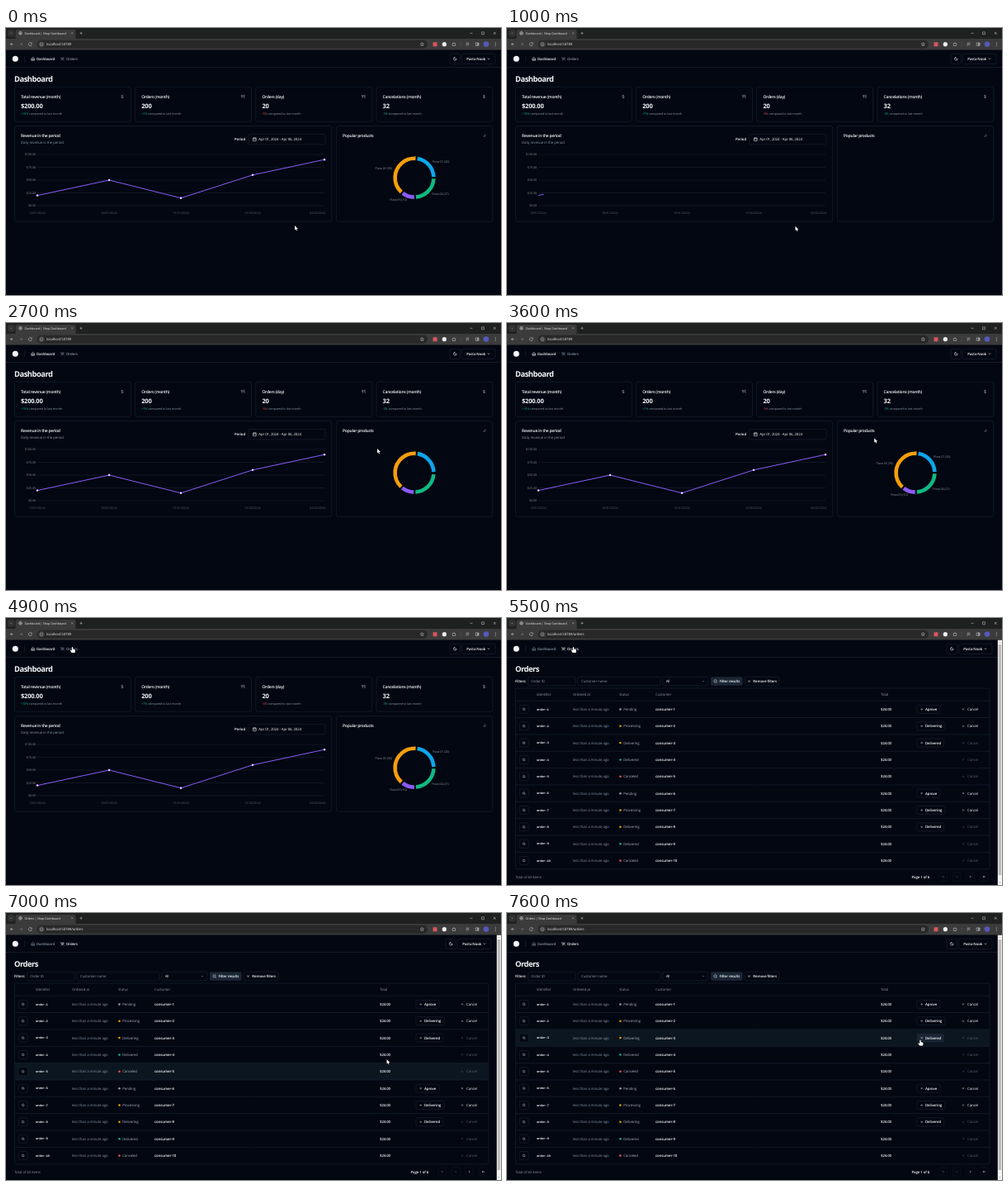
These frames come from a looping animation (600 px wide and 323 px high, 8000 ms). An HTML page with a canvas:

```html
<!DOCTYPE html>
<html lang="en">
<head>
<meta charset="utf-8">
<title>Shop dashboard</title>
<style>
html, body { margin: 0; width: 100%; height: 100%; overflow: hidden; background: #020711; }
canvas { display: block; width: 600px; height: 323px; }
</style>
</head>
<body>
<canvas id="stage"></canvas>
<script>
const LOOP = 8000, STEP = 100;
const canvas = document.getElementById('stage');
const ctx = canvas.getContext('2d');
const ratio = window.devicePixelRatio || 1;
canvas.width = 600 * ratio;
canvas.height = 323 * ratio;

const BG = '#020711', WHITE = '#f5f7fa', MUTED = '#8793a6', DIM = '#566174', BORDER = '#182031';
const SKY = '#0ea5e9', AMBER = '#f59e0b', VIOLET = '#8b5cf6', GREEN = '#10b981', ROSE = '#f4515e';
const SHOP = 'Pasta Nook';

const ICONS = {
  home: 'M3 10l9-7 9 7v11H3zM9 21v-9h6v9',
  utensils: 'M3 2v7c0 1 1 2 2 2h4a2 2 0 0 0 2-2V2M7 2v20M21 15V2a5 5 0 0 0-5 5v6c0 1 1 2 2 2h3zm0 0v7',
  crossed: 'M16 2l-2.3 2.3a3 3 0 0 0 0 4.2l1.8 1.8a3 3 0 0 0 4.2 0L22 8M15 15L3.3 3.3a4.2 4.2 0 0 0 0 6l7.3 7.3c.7.7 2 .7 2.8 0zl7 7M2 22l6.5-6.5M19 5l-7 7',
  dollar: 'M12 2v20M17 5H9.5a3.5 3.5 0 0 0 0 7h5a3.5 3.5 0 0 1 0 7H6',
  calendar: 'M3 4h18v18H3zM3 10h18M8 2v4M16 2v4',
  bars: 'M12 20V10M18 20V4M6 20v-4',
  moon: 'M12 3a6 6 0 0 0 9 9 9 9 0 1 1-9-9z',
  down: 'M6 9l6 6 6-6',
  search: 'M21 21l-4.3-4.3M19 11a8 8 0 1 1-16 0 8 8 0 0 1 16 0z',
  close: 'M18 6L6 18M6 6l12 12',
  right: 'M5 12h14M12 5l7 7-7 7',
  left: 'M19 12H5M12 19l-7-7 7-7',
  reload: 'M21 12a9 9 0 1 1-3-6.7L21 8M21 3v5h-5',
  star: 'M12 2l3 6.5 7 .8-5.2 4.8 1.4 7-6.2-3.5-6.2 3.5 1.4-7L2 9.3l7-.8z',
  plus: 'M5 12h14M12 5v14',
  minus: 'M5 12h14',
  square: 'M5 5h14v14H5z',
  panel: 'M3 4h18v16H3zM14 4v16M17 4v16M20 4v16',
  list: 'M3 5h18M3 12h11M3 19h8M18 10v9',
  puzzle: 'M4 7h5V4h5v3h5v5h2v4h-2v5H4z',
  info: 'M22 12a10 10 0 1 1-20 0 10 10 0 0 1 20 0zM12 11v6M12 7v1',
  globe: 'M22 12a10 10 0 1 1-20 0 10 10 0 0 1 20 0zM2 12h20M12 2c-5 6-5 14 0 20 5-6 5-14 0-20',
  prev: 'M15 18l-6-6 6-6',
  next: 'M9 18l6-6-6-6',
  first: 'M11 17l-5-5 5-5M18 17l-5-5 5-5',
  last: 'M6 17l5-5-5-5M13 17l5-5-5-5'
};
for (const name in ICONS) ICONS[name] = new Path2D(ICONS[name]);
const ARROW = new Path2D('M0 0V6.1L1.4 4.8 2.4 7 3.4 6.5 2.5 4.5H4.4Z');
const HAND = new Path2D('M-.7 .4Q0-.5 .7 .4V2.6L3 3.2Q3.6 3.5 3.5 4.4L3 7H-.9L-2.6 4.4Q-2.6 3.4-1.6 3.8L-.7 4.5Z');

// y is the vertical centre of the capitals
function text(str, x, y, { color = WHITE, size = 4.375, weight = 400, align = 'left', track = -0.025, font = '"Open Sans", sans-serif' } = {}) {
  ctx.font = `${weight} ${size}px ${font}`;
  ctx.letterSpacing = `${track * size}px`;
  ctx.textAlign = align;
  ctx.fillStyle = color;
  ctx.fillText(str, x, y + size * 0.35);
}

function box(x, y, w, h, { fill, stroke, r = 1.8 } = {}) {
  ctx.beginPath();
  ctx.roundRect(x, y, w, h, r);
  if (fill) { ctx.fillStyle = fill; ctx.fill(); }
  if (stroke) { ctx.strokeStyle = stroke; ctx.lineWidth = 0.7; ctx.stroke(); }
}

function icon(name, cx, cy, size = 5, color = WHITE) {
  ctx.save();
  ctx.translate(cx - size / 2, cy - size / 2);
  ctx.scale(size / 24, size / 24);
  ctx.lineWidth = 2.6;
  ctx.strokeStyle = color;
  ctx.stroke(ICONS[name]);
  ctx.restore();
}

function dot(x, y, r, color) {
  ctx.beginPath();
  ctx.arc(x, y, r, 0, 7);
  ctx.fillStyle = color;
  ctx.fill();
}

function line(points, color, width) {
  ctx.beginPath();
  points.forEach(([x, y]) => ctx.lineTo(x, y));
  ctx.strokeStyle = color;
  ctx.lineWidth = width;
  ctx.stroke();
}

const clamp = v => Math.min(1, Math.max(0, v));

// cubic-bezier(.25, .1, .25, 1)
function ease(x) {
  x = clamp(x);
  if (x === 0 || x === 1) return x;
  let lo = 0, hi = 1, u;
  for (let i = 0; i < 20; i++) {
    u = (lo + hi) / 2;
    if (0.75 * u * (1 - u) + u ** 3 < x) lo = u; else hi = u;
  }
  return 0.3 * u * (1 - u) ** 2 + 3 * u * u * (1 - u) + u ** 3;
}

const PATH = [
  [0, 350, 239], [900, 349, 239], [1500, 352, 243], [2100, 372, 250], [2300, 400, 235],
  [2700, 450, 152], [3000, 430, 133], [3500, 440, 145], [4000, 466, 116], [4400, 300, 85],
  [4900, 80.5, 35], [5700, 80.5, 35], [6200, 330, 205], [6500, 400, 221], [6900, 458, 190],
  [7000, 461.5, 177], [7100, 464, 177], [7200, 472, 200], [7400, 490, 178], [7600, 501, 153.5], [LOOP, 501, 153.5]
];
function pointer(t) {
  const i = Math.max(1, PATH.findIndex(key => key[0] >= t));
  const [t0, x0, y0] = PATH[i - 1], [t1, x1, y1] = PATH[i];
  const k = (t - t0) / (t1 - t0);
  return [x0 + (x1 - x0) * k, y0 + (y1 - y0) * k];
}

function drawBrowser(title, path) {
  const grey = '#c7c7c7';
  box(0, 0, 600, 13, { fill: '#1f2020', r: 0 });
  box(0, 13, 600, 13.5, { fill: '#3b3b3b', r: 0 });
  box(2, 2, 8.5, 8.5, { fill: '#303131', r: 2.5 });
  icon('down', 6.2, 6.3, 4, grey);
  box(11.5, 2, 73, 13, { fill: '#3b3b3b', r: 2.5 });
  icon('globe', 17.5, 6.3, 4.6, grey);
  text(title, 22.5, 6.4, { size: 3.75, color: '#e3e3e3' });
  icon('close', 80.2, 6.3, 4, grey);
  icon('plus', 91, 6.3, 5, grey);
  icon('minus', 564, 6.3, 5, grey);
  icon('square', 578, 6.3, 5, grey);
  icon('close', 592.3, 6.3, 5.5, grey);

  icon('left', 7, 19.6, 5.5, grey);
  icon('right', 18.2, 19.6, 5.5, '#777');
  icon('reload', 29.3, 19.6, 5.2, grey);
  box(37.5, 14.7, 473.5, 10, { fill: '#282828', r: 5 });
  dot(43, 19.7, 3.8, '#3b3b3b');
  icon('info', 43, 19.7, 4.4, grey);
  text('localhost:50789' + path, 49, 19.7, { color: '#e3e3e3' });
  icon('star', 504.3, 19.6, 5, grey);
  box(517.5, 17.2, 5, 5, { fill: '#d9555c', r: 0.5 });
  dot(531.3, 19.7, 2.6, '#eeeeee');
  icon('puzzle', 543, 19.6, 5, grey);
  line([[551.3, 17], [551.3, 22.4]], '#555', 0.5);
  icon('list', 559.5, 19.6, 5, grey);
  icon('panel', 571, 19.6, 5, grey);
  dot(582, 19.6, 3.3, '#5657b8');
  for (const y of [17.8, 19.6, 21.4]) dot(593.3, y, 0.5, grey);
}

function drawHeader(onOrders) {
  const shift = onOrders ? -5 : 0;
  dot(11.3, 37.3, 3.5, WHITE);
  line([[22.5, 33.5], [22.5, 41.3]], BORDER, 0.7);
  const link = (name, label, x, active) => {
    const color = active ? WHITE : MUTED;
    icon(name, x + 2.6, 37.3, 5, color);
    text(label, x + 7, 37.3, { weight: 600, color });
  };
  link('home', 'Dashboard', 30, !onOrders);
  link('crossed', 'Orders', 66, onOrders);
  box(538 + shift, 31.2, 12.5, 12.3, { stroke: BORDER });
  icon('moon', 544.3 + shift, 37.3, 5);
  box(552.5 + shift, 31.2, 40.5, 12.3, { stroke: BORDER });
  text(SHOP, 558.3 + shift, 37.3, { weight: 600 });
  icon('down', 585 + shift, 37.3, 5);
  line([[0, 47.5], [600, 47.5]], BORDER, 0.8);
}

const heading = label => text(label, 10, 61.3, { size: 9.375, weight: 700, track: -0.05 });
const cardTitle = (label, x, y) => text(label, x, y, { size: 5, weight: 600, track: -0.05 });

const CARDS = [
  ['Total revenue (month)', '$200.00', '+10%', GREEN, 'dollar'],
  ['Orders (month)', '200', '+7%', GREEN, 'utensils'],
  ['Orders (day)', '20', '-5%', ROSE, 'utensils'],
  ['Cancelations (month)', '32', '-5%', GREEN, 'dollar']
];
const REVENUE = [20, 50, 15, 60, 90].map((v, i) => [38 + i * 87, 215 - v * 0.62]);
const DAYS = ['29/01/2024', '30/01/2024', '31/01/2024', '01/02/2024', '02/02/2024'];
const SLICES = [['Pizza 01', 20, SKY], ['Pizza 03', 35, AMBER], ['Pizza 05', 10, VIOLET], ['Pizza 04', 21, GREEN]];

function drawRevenue(progress) {
  for (let i = 0; i < 5; i++) {
    const y = 215 - i * 15.5;
    line([[38, y], [386, y]], '#1d212c', 0.6);
    text(`$${i * 25}.00`, 36, y, { size: 3.75, color: '#888', align: 'right' });
    text(DAYS[i], i < 4 ? 38 + i * 87 : 377.5, 224, { size: 3.75, color: '#5b5d63', align: 'center' });
  }
  let length = 0;
  REVENUE.forEach(([x, y], i) => { if (i) length += Math.hypot(x - REVENUE[i - 1][0], y - REVENUE[i - 1][1]); });
  ctx.setLineDash([length * progress, length * 2]);
  line(REVENUE, VIOLET, 1);
  ctx.setLineDash([]);
  if (progress === 1) for (const [x, y] of REVENUE) { dot(x, y, 1.4, VIOLET); dot(x, y, 1, '#fff'); }
}

function drawDonut(progress, labelled) {
  const cx = 495, cy = 181.2, radius = 23.4, gap = 0.045;
  const total = SLICES.reduce((sum, slice) => sum + slice[1], 0);
  let from = 0;
  for (const [name, value, color] of SLICES) {
    const sweep = value / total * Math.PI * 2 * progress;
    if (sweep > gap * 2) {
      ctx.beginPath();
      ctx.arc(cx, cy, radius, -from - gap, -from - sweep + gap, true);
      ctx.strokeStyle = color;
      ctx.lineWidth = 4.6;
      ctx.stroke();
    }
    if (labelled) {
      const mid = from + sweep / 2, side = Math.cos(mid);
      text(`${name} (${value})`, cx + 29.5 * side, cy - 28.75 * Math.sin(mid) - 0.3,
        { size: 3.75, color: '#8d9096', align: side > 0 ? 'left' : 'right' });
    }
    from += sweep;
  }
}

function drawDashboard(t) {
  const settled = t < 300, loaded = settled || t >= 900;
  heading('Dashboard');
  CARDS.forEach(([title, value, change, color, glyph], i) => {
    const x = 10.4 + i * 146.2;
    box(x, 71.3, 140.9, 42, { stroke: BORDER, r: 2.5 });
    cardTitle(title, x + 7.6, 83);
    icon(glyph, x + 130.5, 83, 5, MUTED);
    if (!loaded) return;
    text(value, x + 7.6, 94.8, { size: 7.5, weight: 700 });
    text(change, x + 7.6, 103.4, { size: 3.75, color });
    text(' compared to last month', x + 7.6 + ctx.measureText(change).width, 103.4, { size: 3.75, color: MUTED });
  });

  box(10.4, 118.6, 384.4, 115.6, { stroke: BORDER, r: 2.5 });
  cardTitle('Revenue in the period', 18, 130);
  text('Daily revenue in the period', 18, 138.3, { color: MUTED });
  text('Period', 277, 134.6, { weight: 600 });
  box(293.7, 128.4, 93.3, 12.4, { stroke: BORDER });
  icon('calendar', 301.3, 134.6, 5);
  text('Apr 01, 2024 - Apr 06, 2024', 306.3, 134.6, { weight: 500 });

  box(400.4, 118.6, 189.4, 115.6, { stroke: BORDER, r: 2.5 });
  cardTitle('Popular products', 408, 130);
  icon('bars', 579.7, 130, 5, MUTED);
  if (!loaded) return;
  drawRevenue(settled ? 1 : ease((t - 950) / 1500));
  drawDonut(settled ? 1 : ease((t - 1350) / 1500), settled || t >= 2950);
}

const STATUSES = [
  ['Pending', '#94a3b8', 'Aprove', 28], ['Processing', AMBER, 'Delivering', 34],
  ['Delivering', AMBER, 'Delivered', 32.5], ['Delivered', GREEN], ['Canceled', ROSE]
];
const ROW_TOP = 100.2, ROW_HEIGHT = 20.35;

function drawRow(i, hovered, pressing) {
  const top = ROW_TOP + i * ROW_HEIGHT, y = top + ROW_HEIGHT / 2;
  const [status, color, action, width] = STATUSES[i % 5];
  if (hovered) box(10.8, top, 573.8, ROW_HEIGHT, { fill: '#0c1620', r: 0 });
  line([[10.5, top], [585, top]], BORDER, 0.7);
  box(15.2, y - 5, 10.8, 10, { fill: BG, stroke: BORDER });
  icon('search', 20.6, y, 3.8);
  text(`order-${i + 1}`, 36, y, { size: 3.75, weight: 700, track: -0.05, font: '"Liberation Mono", monospace' });
  text('less than a minute ago', 80, y, { color: MUTED });
  dot(137.4, y, 1.25, color);
  text(status, 141.2, y, { weight: 500, color: '#a3adbc' });
  text(`consumer-${i + 1}`, 180, y, { weight: 600 });
  text('$24.00', 453, y, { weight: 600 });
  if (action) {
    box(497, y - 5, width, 10, { fill: pressing ? '#1b2635' : BG, stroke: BORDER });
    icon('right', 502.4, y, 3.8);
    text(action, 507, y, { weight: 600 });
  }
  const shade = i % 5 < 2 ? WHITE : DIM;
  icon('close', 553, y, 3.8, shade);
  text('Cancel', 558, y, { weight: 500, color: shade });
}

function drawOrders(t, handAt) {
  heading('Orders');
  const y = 76.5, h = 10.6, top = y - h / 2;
  text('Filters:', 10, y, { weight: 600 });
  box(25.5, top, 57.5, h, { stroke: BORDER });
  text('Order ID', 29.3, y, { color: MUTED });
  box(85.8, top, 100, h, { stroke: BORDER });
  text('Customer name', 90, y, { color: MUTED });
  box(188.8, top, 55, h, { stroke: BORDER });
  text('All', 192.7, y);
  icon('down', 238, y, 4.5, MUTED);
  box(247, top, 38.5, h, { fill: '#1b2635' });
  icon('search', 252.7, y, 4.8);
  text('Filter results', 257.5, y, { weight: 600 });
  box(288, top, 42, h, { stroke: BORDER });
  icon('close', 293.5, y, 4.8);
  text('Remove filters', 298.3, y, { weight: 600 });

  const heads = { Identifier: 36, 'Ordered at': 80, Status: 136, Customer: 180, Total: 453 };
  for (const name in heads) text(name, heads[name], 92.6, { weight: 500, color: MUTED });
  if (t >= 5500) {
    const hoverY = t >= 5600 ? pointer(Math.max(0, t - 60))[1] : 0;
    const hoverRow = Math.floor((hoverY - ROW_TOP) / ROW_HEIGHT);
    for (let i = 0; i < 10; i++) drawRow(i, i === hoverRow, i === hoverRow && handAt);
  }
  box(10.4, 85, 574.6, 218.8, { stroke: BORDER });

  text('Total of 60 items', 10, 313, { color: MUTED });
  text('Page 1 of 6', 490.5, 313, { weight: 600 });
  ['first', 'prev', 'next', 'last'].forEach((name, i) => {
    const x = 528.7 + i * 16.5;
    box(x - 5, 308, 10, 10, { stroke: '#0e1523' });
    icon(name, x, 313, 5, i < 2 ? DIM : WHITE);
  });

  box(594.8, 26.5, 5.2, 297, { fill: '#f4f4f4', r: 0 });
  box(595.6, 32, 3.6, 279, { fill: '#bdbdbd', r: 0 });
  icon('down', 597.4, 319.7, 4, '#555');
  ctx.save();
  ctx.translate(597.4, 29.5);
  ctx.scale(1, -1);
  icon('down', 0, 0, 4, '#888');
  ctx.restore();
}

function drawPointer(x, y, hand) {
  const shape = hand ? HAND : ARROW;
  ctx.save();
  ctx.translate(x, y);
  if (!hand) ctx.scale(0.9, 0.9);
  ctx.strokeStyle = '#000';
  ctx.lineWidth = 0.9;
  ctx.stroke(shape);
  ctx.fillStyle = '#fff';
  ctx.fill(shape);
  ctx.restore();
}

function draw(now) {
  const t = Math.floor(now % LOOP / STEP) * STEP;
  const onOrders = t >= 5400;
  const [x, y] = pointer(t);
  const hand = (x < 90 && y < 43) || (x > 497 && y < 160);
  ctx.setTransform(ratio, 0, 0, ratio, 0, 0);
  ctx.textRendering = 'geometricPrecision';
  ctx.lineJoin = 'round';
  box(0, 0, 600, 323, { fill: BG, r: 0 });
  drawHeader(onOrders);
  if (onOrders) drawOrders(t, hand); else drawDashboard(t);
  drawBrowser(`${t >= 5600 ? 'Orders' : 'Dashboard'} | Shop Dashboard`, onOrders ? '/orders' : '');
  drawPointer(x, y, hand);
  requestAnimationFrame(draw);
}
requestAnimationFrame(draw);
</script>
</body>
</html>
```
